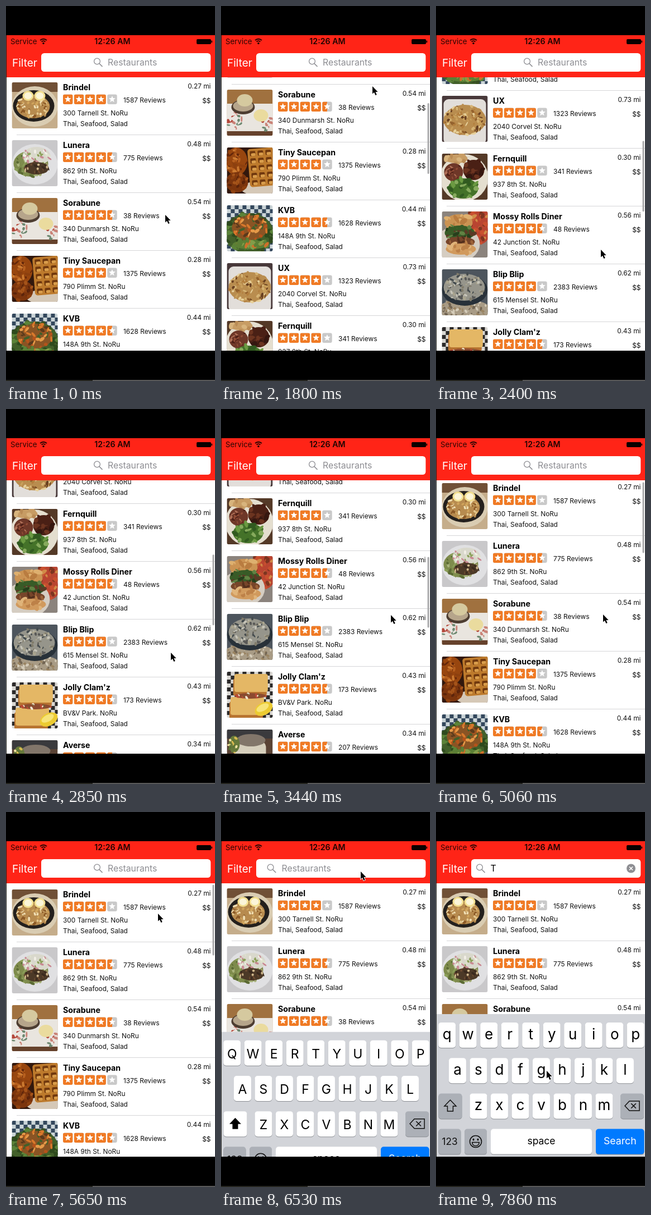
Animation, 374 px wide and 668 px high, one loop 8000 ms. Source, as an HTML page with a canvas:

```html
<!DOCTYPE html>
<html lang="en">
<head>
<meta charset="utf-8">
<title>Restaurant list</title>
<style>
html, body { margin: 0; width: 100%; height: 100%; overflow: hidden; background: #000; }
canvas { display: block; width: 374px; height: 668px; }
</style>
</head>
<body>
<canvas id="stage"></canvas>
<script>
const W = 374, H = 668, LOOP = 8000;
const TOP = 127, BOTTOM = 614, ROW = 103, PHOTO = 82;
const RED = '#ff2417', ORANGE = '#f07a24', GRAY = '#c9c9c9', HINT = '#8e8e93', INK = '#111';
const canvas = document.getElementById('stage');
const c = canvas.getContext('2d');
const dpr = window.devicePixelRatio || 1;
canvas.width = W * dpr;
canvas.height = H * dpr;

// ---- drawing helpers ----
function box(color, x, y, w, h, r = 0) {
  c.fillStyle = color;
  c.beginPath();
  c.roundRect(x, y, w, h, r);
  c.fill();
}
function oval(color, x, y, rx, ry = rx, turn = 0) {
  c.fillStyle = color;
  c.beginPath();
  c.ellipse(x, y, rx, ry, turn, 0, Math.PI * 2);
  c.fill();
}
function arc(color, width, x, y, r, from = 0, to = Math.PI * 2, close = false) {
  c.strokeStyle = color;
  c.lineWidth = width;
  c.beginPath();
  c.arc(x, y, r, from, to);
  if (close) c.closePath();
  c.stroke();
}
function text(str, x, y, size, color = '#000', weight = 400, align = 'left') {
  c.font = `${weight} ${size}px Inter, Roboto, sans-serif`;
  c.textAlign = align;
  c.fillStyle = color;
  c.fillText(str, x, y);
}
function trace(points) {
  c.beginPath();
  points.forEach(([x, y]) => c.lineTo(x, y));
  c.closePath();
}
function outline(color, width, points) {
  c.strokeStyle = color;
  c.lineWidth = width;
  trace(points);
  c.stroke();
}
function shape(color, points) {
  c.fillStyle = color;
  trace(points);
  c.fill();
}
function cross(color, x, y, r) {
  outline(color, 1.6, [[x - r, y - r], [x + r, y + r]]);
  outline(color, 1.6, [[x + r, y - r], [x - r, y + r]]);
}
function clipped(x, y, w, h, r, draw) {
  c.save();
  c.beginPath();
  c.roundRect(x, y, w, h, r);
  c.clip();
  draw();
  c.restore();
}

// ---- dishes, each in a square of side PHOTO ----
let rnd;
function random(seed) {
  return () => (seed = (seed * 16807) % 2147483647) / 2147483647;
}
// An oval of food, covered with random crumbs of the palette.
function heap(palette, x, y, rx, ry, size = 3) {
  const colors = palette.split(' ');
  oval(colors[0], x, y, rx, ry);
  const count = rx * ry / size / 3;
  for (let i = 0; i < count; i++) {
    const a = rnd() * Math.PI * 2, d = Math.sqrt(rnd());
    oval(colors[i % colors.length], x + Math.cos(a) * d * rx, y + Math.sin(a) * d * ry,
      size * (0.5 + rnd()), size * (0.3 + rnd() * 0.5), rnd() * 3);
  }
}
function plate(color, x = 41, y = 43, rx = 41, ry = 36) {
  oval(color, x, y, rx, ry);
}
function back(color) {
  box(color, 0, 0, PHOTO, PHOTO);
}
function checks(size, dark, light) {
  back(light);
  for (let y = 0; y < PHOTO; y += size)
    for (let x = y / size % 2 * size; x < PHOTO; x += size * 2) box(dark, x, y, size, size);
}
function waffle() {
  c.save();
  c.rotate(-0.08);
  box('#bd7a2c', 36, 6, 48, 68, 5);
  for (let x = 40; x < 82; x += 14)
    for (let y = 10; y < 72; y += 13) {
      box('#70380e', x, y, 10, 9, 2);
      box('#d99d4b', x + 2, y + 4, 8, 5, 2);
    }
  c.restore();
}

const dishes = [
  () => {
    back('#c5ad8b');
    box('#705036', 0, 0, PHOTO, 17);
    plate('#d9ccb2');
    plate('#24201d', 39, 42, 37, 28);
    heap('#b78b4f #e2c68c #8c5a27 #d0a45c #f0dfb4', 38, 43, 30, 21);
    for (const x of [29, 50]) {
      oval('#f2df90', x, 24, 10, 9);
      oval('#fbf5d8', x, 24, 7, 6);
    }
  },
  () => {
    back('#c9c8ca');
    plate('#e0e0e2');
    heap('#7e8b4c #a8b27a #8ca05a #5c6b34', 34, 42, 31, 23, 4);
    heap('#d9d8cc #8ca05a #c98993 #f2efe6 #dfe3cd', 44, 28, 25, 16);
    heap('#4c3927 #6b4a30 #3a2a1e #cfb78c', 44, 50, 22, 11);
  },
  () => {
    back('#a0713f');
    box('#e9e5df', 0, 25, PHOTO, 49);
    box('#66422c', 0, 74, PHOTO, 8);
    for (const x of [13, 69]) heap('#e9e5df #b4463a #e9e5df #6d8870 #c98277', x, 54, 15, 18, 4);
    oval('#4d3d31', 29, 31, 21, 13);
    oval('#b6a58b', 29, 29, 18, 10);
    oval('#d5c99f', 32, 19, 14, 11);
    oval('#eadb9e', 61, 46, 13, 11);
  },
  () => {
    back('#32180d');
    plate('#d5c8b7', 60, 73, 35, 13);
    heap('#98460f #b7601f #64270a #cc7b31 #8d400f', 17, 25, 20, 25, 4);
    heap('#7c350d #a5541a #5c240a #8d400f', 18, 62, 20, 18, 4);
    waffle();
  },
  () => {
    checks(7, '#34485d', '#cbd4d7');
    heap('#42602a #2e4a1d #5b8338 #384f22', 40, 50, 44, 36, 6);
    heap('#8a5424 #d8782b #b5531b #5b3a1c #e59a48 #42602a', 41, 40, 32, 22, 4);
    heap('#5b7f35 #cf702b #829d49', 42, 70, 32, 8, 4);
  },
  () => {
    back('#48393a');
    box('#e2deda', 3, 6, 76, 80, 9);
    heap('#b98d4f #d6b475 #93612d #e7d09a #b37e3d #694021 #c9a05c', 41, 43, 38, 27);
  },
  () => {
    back('#543927');
    plate('#e4decf', 40, 43, 43, 42);
    heap('#c79c64 #d8b47d #b98b55', 26, 9, 20, 8, 5);
    heap('#6e3728 #914c36 #512118 #b07058', 21, 33, 17, 16);
    heap('#4a2015 #6c3420 #351710', 57, 29, 19, 18, 6);
    heap('#447229 #6b9a42 #315a20 #86aa5d', 38, 62, 27, 18, 5);
  },
  () => {
    back('#8b837d');
    heap('#b94531 #7d3420 #c9502f #d18b47', 66, 25, 24, 34, 5);
    plate('#d5cdc2', 28, 58, 40, 32);
    heap('#cb9353 #deb06f #b97c40', 30, 20, 25, 15, 6);
    heap('#385b27 #618243 #263f1c #5a3a25', 32, 38, 27, 13, 5);
    heap('#77452a #9c6238 #54301d', 33, 54, 26, 9, 4);
    heap('#d19a5d #e0b47a #bd8148', 34, 67, 27, 10, 6);
  },
  () => {
    back('#4d555d');
    heap('#a89b85 #d4cbb8 #726553 #998361', 40, 72, 48, 18);
    plate('#283139', 41, 37, 41, 28);
    heap('#96958b #c6c4b8 #595957 #807b6a #444b4e #aaa58f', 40, 32, 37, 24);
  },
  () => {
    checks(7, '#2c2a2a', '#d9d7d3');
    for (const y of [4, 45]) {
      box('#b87431', 12 - y / 6, y + 8, 60, 31, 4);
      box('#e4b765', 14 - y / 6, y, 60, 32, 4);
    }
    heap('#8c4a30 #b94a35 #f0e6cf #7b5a33', 42, 43, 28, 5);
    oval('#eccb32', 66, 66, 17, 11, -0.5);
    oval('#f7e479', 64, 64, 12, 6, -0.5);
  },
  () => {
    back('#5a4335');
    box('#3a3a3d', 0, 0, PHOTO, 16);
    box('#d6cfbc', 13, 20, 57, 36, 12);
    oval('#82766a', 43, 19, 26, 11);
    heap('#66793b #d6b950 #f0e2a0 #597233', 13, 26, 10, 15);
  }
];

// name | reviews | address | miles | rating
const places = `Brindel|1587|300 Tarnell St. NoRu|0.27|4
Lunera|775|862 9th St. NoRu|0.48|4.5
Sorabune|38|340 Dunmarsh St. NoRu|0.54|4.5
Tiny Saucepan|1375|790 Plimm St. NoRu|0.28|4
KVB|1628|148A 9th St. NoRu|0.44|4.5
UX|1323|2040 Corvel St. NoRu|0.73|4
Fernquill|341|937 8th St. NoRu|0.30|4
Mossy Rolls Diner|48|42 Junction St. NoRu|0.56|4.5
Blip Blip|2383|615 Mensel St. NoRu|0.62|4
Jolly Clam'z|173|BV&V Park. NoRu|0.43|4.5
Averse|207|178 Mensel St. NoRu|0.34|4.5`.split('\n').map(s => s.split('|'));

// ---- motion: each move is [first step, last step, ...goal] ----
const pointerMoves = [
  [0, 2, 282, 303], [7, 10, 270, 142], [12, 16, 294, 433], [19, 23, 303, 366],
  [23, 26, 306, 440], [26, 30, 309, 187], [31, 34, 298, 365], [34, 38, 271, 180],
  [39, 40, 257, 120], [41, 43, 249, 105], [46, 50, 170, 392], [51, 53, 197, 460]
];
const scrollMoves = [
  [7, 10, 161], [11, 12, 193], [12, 23, 595], [23, 28, 297], [31, 36, -16], [36, 40, 0]
];
const keyboardMoves = [[43, 45, 1]];

const smooth = p => p * p * (3 - 2 * p);
const slowDown = p => 1 - (1 - p) ** 3;

function follow(moves, start, n, ease) {
  return moves.reduce((from, [first, last, ...goal]) => {
    const p = ease(Math.min(1, Math.max(0, (n - first) / (last - first))));
    return from.map((v, i) => v + (goal[i] - v) * p);
  }, start);
}
// The picture advances in hard steps of about 150 ms.
function stepAt(t) {
  return t < 3140 ? Math.floor(t / 150) : 21 + Math.floor((t - 3140) / 147.3);
}

// ---- screen parts ----
function star(x, y, fill) {
  const size = 17.5, mid = size / 2;
  box(GRAY, x, y, size, size, 3);
  if (fill) clipped(x, y, size * fill, size, 0, () => box(ORANGE, x, y, size, size, 3));
  shape('#fff', Array.from({ length: 10 }, (_, i) => {
    const a = i * Math.PI / 5 - Math.PI / 2, r = i % 2 ? 2.7 : 6.3;
    return [x + mid + Math.cos(a) * r, y + mid + Math.sin(a) * r];
  }));
}
function row(i, y) {
  const [name, reviews, address, miles, rating] = places[i];
  clipped(10.5, y + 9, PHOTO, PHOTO, 3, () => {
    c.translate(10.5, y + 9);
    rnd = random(7919 * (i + 1));
    dishes[i]();
  });
  text(name, 102, y + 22.5, 14.2, '#000', 700);
  for (let s = 0; s < 5; s++) star(102 + s * 19.8, y + 30.5, Math.max(0, Math.min(1, rating - s)));
  text(`${reviews} Reviews`, 210, y + 45, 11.9, INK);
  text(address, 102, y + 67.5, 11.9, INK);
  text('Thai, Seafood, Salad', 102, y + 86.5, 11.9, INK);
  text(`${miles} mi`, 366.5, y + 20, 11.9, INK, 400, 'right');
  text('$$', 366.5, y + 45.5, 11.9, INK, 400, 'right');
  box('#d6d6d8', 19, y + 102, W - 19, 1);
}
function list(scroll, showBar) {
  box('#fff', 1, TOP, W, BOTTOM - TOP);
  places.forEach((place, i) => {
    const y = Math.round(TOP + i * ROW - scroll);
    if (y > TOP - ROW && y < BOTTOM) row(i, y);
  });
  if (showBar) box('#a9a9ab', 369.5, 129.6 + 0.225 * Math.max(0, scroll), 3, 126, 1.5);
}
function glass(x, y) {
  arc(HINT, 1.3, x - 2, y - 2, 5.4);
  outline(HINT, 1.7, [[x + 2, y + 2], [x + 7.5, y + 7.5]]);
}
function header(active, typed) {
  box(RED, 1, 52, W - 1, TOP - 52);
  text('Service', 8, 68, 13.3, '#2a0603');
  for (const r of [4.8, 8.3]) arc('#1c0402', 2, 67, 67, r, -Math.PI * 0.75, -Math.PI * 0.25);
  oval('#1c0402', 67, 66.5, 1.7);
  text('12:26 AM', 190.5, 68, 14.2, '#1c0402', 600, 'center');
  box('#0a0100', 341, 59, 26, 9, 2);
  box('#0a0100', 367.5, 61.5, 1.6, 4, 1);
  text('Filter', 11, 107.5, 19, '#fff');
  box('#fff', 63, 84, 303.3, 33, 5.5);
  glass(165 - 85 * active, 100.5);
  if (typed) {
    text('T', 97.5, 106, 15.8);
    oval(HINT, 349, 100.5, 8);
    cross('#fff', 349, 100.5, 3);
  } else {
    text('Restaurants', 182 - 84 * active, 106, 15.8, HINT);
  }
}
function key(color, x, y, w, label = '', size = 17.5, ink = '#000', drop = 27) {
  box('#8c8f94', x, y + 1, w, 45, 5);
  box(color, x, y, w, 45, 5);
  text(label, x + w / 2, y + drop, size, ink, 400, 'center');
}
function keyboard(rise, upper) {
  const dark = '#acb0b7', pitch = 37.5, line = r => 375 + r * 63.2;
  c.translate(0, (1 - rise) * 254);
  box('#d2d4d9', 1, 360, W - 1, 254);
  ['qwertyuiop', 'asdfghjkl', 'zxcvbnm'].forEach((letters, r) => {
    const left = 188.5 - letters.length * pitch / 2 + 3.2;
    [...(upper ? letters.toUpperCase() : letters)].forEach((ch, i) =>
      key('#fff', left + i * pitch, line(r), 31, ch, upper ? 23 : 26, '#000', upper ? 32 : 30));
  });

  key(upper ? '#fff' : dark, 4.5, line(2), 42);
  const arrow = [[0, -11], [10.5, 0], [5, 0], [5, 9], [-5, 9], [-5, 0], [-10.5, 0]]
    .map(([x, y]) => [25.5 + x, 524 + y]);
  if (upper) shape('#000', arrow);
  else outline(INK, 1.5, arrow);

  key(dark, 330, line(2), 42);
  outline(INK, 1.5, [[338, 523.5], [346, 515], [364, 515], [364, 532], [346, 532]]);
  cross(INK, 353.5, 523.5, 4.3);

  key(dark, 4.5, line(3), 40, '123', 17.3, INK, 28.5);
  key(dark, 51, line(3), 40);
  arc(INK, 1.6, 71, 587, 10.5);
  for (const x of [67, 75]) oval(INK, x, 583.5, 1.5, 2);
  arc(INK, 1.6, 71, 588.5, 6.3, 0, Math.PI, true);
  key('#fff', 98, line(3), 181, 'space');
  key('#007aff', 286, line(3), 86.5, 'Search', 17.7, '#fff');
}
function arrowPointer([x, y]) {
  const tip = [[0, 0], [0, 13.5], [3, 10.8], [5.4, 16], [7.7, 15], [5.4, 10], [9.6, 10]]
    .map(([dx, dy]) => [x + 1 + dx, y + 1 + dy]);
  c.lineJoin = 'round';
  outline('#fff', 1.8, tip);
  c.lineJoin = 'miter';
  shape('#000', tip);
}
function desk() {
  box('#000', 0, 0, W, H);
  box('#1d1d17', 0, 52, 1, 562);
  box('#24241f', 0, 666, 155, 2);
  box('#5a5a5a', 155, 666, W - 155, 2);
}

function draw(n) {
  const [scroll] = follow(scrollMoves, [0], n, slowDown);
  const [rise] = follow(keyboardMoves, [0], n, slowDown);
  const showBar = n > 7 && n < 30 || n > 31 && n < 40;
  const typed = n > 50;
  c.setTransform(dpr, 0, 0, dpr, 0, 0);
  desk();
  clipped(1, TOP, W - 1, BOTTOM - TOP, 0, () => {
    list(scroll, showBar);
    if (rise) keyboard(rise, !typed);
  });
  header(rise, typed);
  arrowPointer(follow(pointerMoves, [284, 371], n, smooth));
}

let shown = -1;
function tick(now) {
  const n = stepAt(now % LOOP);
  if (n !== shown) draw(shown = n);
  requestAnimationFrame(tick);
}
draw(0);
requestAnimationFrame(tick);
</script>
</body>
</html>
```
